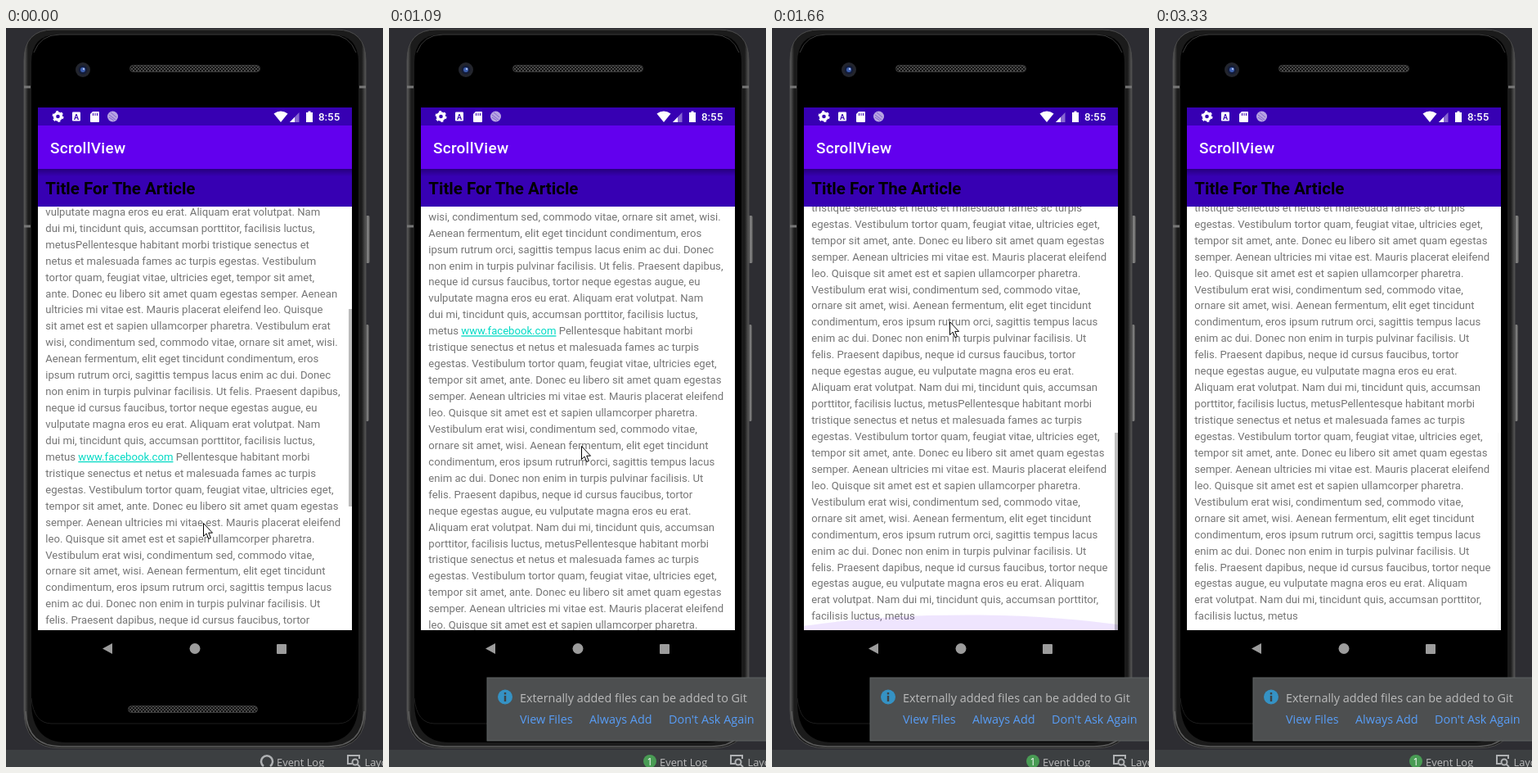
An HTML page that plays this animation: 461x902 px, repeating every 3600 ms.

```html
<!DOCTYPE html>
<html lang="en">
<head>
<meta charset="utf-8">
<title>ScrollView</title>
<style>
html, body { margin: 0; width: 100%; height: 100%; overflow: hidden; background: #2d2d32; }
svg { display: block; }
text { white-space: pre; }
.roboto { font-family: Roboto, sans-serif; }
.ide { font-family: "Open Sans", sans-serif; font-size: 14.4px; fill: #bbb; }
.link { fill: #589df6; }
</style>
</head>
<body>
<svg width="461" height="902" viewBox="0 0 461 902">
  <defs>
    <linearGradient id="rim">
      <stop offset="0" stop-color="#606060"/>
      <stop offset=".012" stop-color="#1b1b1b"/>
      <stop offset=".988" stop-color="#1b1b1b"/>
      <stop offset="1" stop-color="#5a5a5a"/>
    </linearGradient>
    <linearGradient id="key">
      <stop offset="0" stop-color="#333"/>
      <stop offset=".6" stop-color="#8a8a8a"/>
      <stop offset="1" stop-color="#444"/>
    </linearGradient>
    <linearGradient id="shade" x2="0" y2="1">
      <stop offset="0" stop-opacity=".3"/>
      <stop offset="1" stop-opacity="0"/>
    </linearGradient>
    <pattern id="mesh" width="4" height="4" patternUnits="userSpaceOnUse">
      <rect width="4" height="4" fill="#111"/>
      <path d="M0 4L4 0M0 0L4 4" stroke="#4a4a4a"/>
    </pattern>
  </defs>

  <!-- phone body -->
  <rect x="439" y="229" width="6" height="58" rx="2" fill="url(#key)"/>
  <rect x="439" y="362" width="5" height="118" rx="2" fill="url(#key)"/>
  <path d="M22 40Q22 2 58 2H404Q440 2 440 40V832Q440 879 396 879H66Q22 879 22 832Z" fill="url(#rim)" stroke="#4c4c4c"/>
  <path d="M24 834Q26 877 68 877H394Q436 877 438 834" fill="none" stroke="#5c5c5c" stroke-width="1.5"/>
  <path d="M31 42Q31 8 64 8H398Q431 8 431 42V822Q431 872 388 872H74Q31 872 31 822Z"/>
  <path d="M34 30Q42 8 66 8H396Q420 8 428 30" fill="none" stroke="#3a3a3a"/>
  <path d="M31 818Q34 849 56 849H406Q428 849 431 818" fill="none" stroke="#1d1d1d"/>
  <path d="M22 72h8M22 242h8M432 72h8" stroke="#777" stroke-width="3"/>
  <circle cx="94" cy="51" r="9" fill="#23252d"/>
  <circle cx="94" cy="51" r="5.5" fill="#141c38"/>
  <circle cx="94" cy="51" r="3" fill="#3d5fae"/>
  <circle cx="95" cy="50" r="1.2" fill="#a9bdf0"/>
  <g fill="url(#mesh)" stroke="#3a3a3a">
    <rect x="151.5" y="45.500" width="159" height="8" rx="4"/>
    <rect x="149.5" y="827.5" width="158" height="8" rx="4"/>
  </g>

  <!-- app bars -->
  <rect x="39" y="97" width="384" height="121" fill="#3700b3"/>
  <rect x="39" y="119" width="384" height="53" fill="#6200ee"/>
  <rect x="39" y="172" width="384" height="9" fill="url(#shade)"/>
  <g class="roboto">
    <text x="54" y="153" font-size="19" font-weight="500" letter-spacing=".25" fill="#fff">ScrollView</text>
    <text x="48.300" y="203" font-size="20.53" font-weight="700">Title For The Article</text>
    <text x="382" y="113" font-size="13.3" font-weight="500" fill="#fff">8:55</text>
    <g fill="#fff">
      <circle cx="63.500" cy="108" r="4" fill="none" stroke="#fff" stroke-width="3.4"/>
      <circle cx="63.500" cy="108" r="6" fill="none" stroke="#fff" stroke-width="2" stroke-dasharray="2.9 3.38"/>
      <rect x="81" y="102.500" width="10" height="11" rx="1"/>
      <path d="M106 102h7q1 0 1 1v11q0 1-1 1h-9q-1 0-1-1v-9z"/>
      <path d="M106.500 104v3M109 104v3M111.500 104v3" stroke="#3700b3"/>
      <path d="M336 115L327.500 104.500Q336 98.500 344.500 104.500Z"/>
      <path d="M347 115L358.500 103V115Z" opacity=".4"/>
      <path d="M347 115L353 108.700V115Z"/>
      <path d="M367 103h2.500v-1.500h3v1.500H375v12h-8z"/>
    </g>
    <text x="86" y="111.500" font-size="9" font-weight="700" text-anchor="middle" fill="#3700b3">A</text>
    <circle cx="130.500" cy="108" r="6.500" fill="#b7a4e2"/>
    <path d="M126 106l8 6M126 109l6 4M128 103l7 6" stroke="#8062cc"/>
  </g>

  <!-- article -->
  <svg x="39" y="218" width="384" height="517" class="roboto">
    <rect width="384" height="517" fill="#fff"/>
    <g id="article" font-size="13.14" fill="#757575"></g>
    <ellipse id="glow" cx="198" rx="461" fill="#6200ee"/>
    <rect id="bar" x="380" width="4" height="241" fill="#000"/>
  </svg>

  <g fill="#9c9c9c">
    <path d="M118 757.500L130 751V764Z"/>
    <circle cx="231" cy="757.500" r="6.500"/>
    <rect x="331" y="752" width="12" height="12" rx="1"/>
  </g>

  <!-- status strip -->
  <rect y="881" width="461" height="21" fill="#3c3f41"/>
  <g class="ide" style="font-size:12.9px">
    <text x="331" y="901">Event Log</text>
    <text x="438.500" y="901">Layout Inspector</text>
  </g>
  <g fill="none" stroke="#afb1b3" stroke-width="2">
    <path d="M432 892V888H418V898H423"/>
    <circle cx="427" cy="896" r="3.500"/>
    <path d="M429.500 898.500L433 902"/>
    <path id="idle" d="M315 901A7 7 0 1 1 323 901" stroke-width="2.500"/>
  </g>
  <g id="badge">
    <circle cx="319" cy="895" r="8" fill="#499c54"/>
    <text class="ide" x="319" y="899.500" text-anchor="middle" style="font-size:12px;fill:#fff">1</text>
  </g>

  <!-- notification -->
  <g id="popup" class="ide">
    <rect x="120" y="793" width="350" height="77" fill="#4d4f50" stroke="#5e6263"/>
    <circle cx="142" cy="816.500" r="9" fill="#3592c4"/>
    <path d="M142 811v2.500M142 815v7" stroke="#3d4346" stroke-width="2.400"/>
    <text x="160" y="823">Externally added files can be added to Git</text>
    <g class="link">
      <text x="160" y="849">View Files</text>
      <text x="245" y="849">Always Add</text>
      <text x="342" y="849">Don't Ask Again</text>
    </g>
  </g>

  <path id="cursor" d="M.5 .5V16.500L4 13L6.800 19.500L9.400 18.400L6.700 12.200H11.500Z" fill="#fff" stroke="#000"/>
</svg>
<script>
const $ = id => document.getElementById(id);
const set = (id, attrs) => { for (const k in attrs) $(id).setAttribute(k, attrs[k]); };

const opening = `vulputate magna eros eu erat. Aliquam erat volutpat. Nam
dui mi, tincidunt quis, accumsan porttitor, facilisis luctus,`;
const passage = `tristique senectus et netus et malesuada fames ac turpis
egestas. Vestibulum tortor quam, feugiat vitae, ultricies eget,
tempor sit amet, ante. Donec eu libero sit amet quam egestas
semper. Aenean ultricies mi vitae est. Mauris placerat eleifend
leo. Quisque sit amet est et sapien ullamcorper pharetra.
Vestibulum erat wisi, condimentum sed, commodo vitae,
ornare sit amet, wisi. Aenean fermentum, elit eget tincidunt
condimentum, eros ipsum rutrum orci, sagittis tempus lacus
enim ac dui. Donec non enim in turpis pulvinar facilisis. Ut`;
const article = `${opening}
metusPellentesque habitant morbi tristique senectus et
netus et malesuada fames ac turpis egestas. Vestibulum
tortor quam, feugiat vitae, ultricies eget, tempor sit amet,
ante. Donec eu libero sit amet quam egestas semper. Aenean
ultricies mi vitae est. Mauris placerat eleifend leo. Quisque
sit amet est et sapien ullamcorper pharetra. Vestibulum erat
wisi, condimentum sed, commodo vitae, ornare sit amet, wisi.
Aenean fermentum, elit eget tincidunt condimentum, eros
ipsum rutrum orci, sagittis tempus lacus enim ac dui. Donec
non enim in turpis pulvinar facilisis. Ut felis. Praesent dapibus,
neque id cursus faucibus, tortor neque egestas augue, eu
${opening}
metus <tspan fill="#03dac5" text-decoration="underline">www.facebook.com</tspan> Pellentesque habitant morbi
${passage}
felis. Praesent dapibus, neque id cursus faucibus, tortor
neque egestas augue, eu vulputate magna eros eu erat.
Aliquam erat volutpat. Nam dui mi, tincidunt quis, accumsan
porttitor, facilisis luctus, metusPellentesque habitant morbi
${passage}
felis. Praesent dapibus, neque id cursus faucibus, tortor neque
egestas augue, eu vulputate magna eros eu erat. Aliquam
erat volutpat. Nam dui mi, tincidunt quis, accumsan porttitor,
facilisis luctus, metus`;
$('article').innerHTML = article.split('\n')
  .map((line, i) => `<text x="9.3" y="${10.8 + i * 19.94}">${line}</text>`).join('');

const ticks = [0, 150, 280, 430, 550, 700, 820, 970, 1090, 1240, 1390, 1510, 1660,
  1790, 1940, 2090, 2210, 2360, 2480, 2660, 2790, 2910, 3030, 3180, 3330];

// Tracks: [time, value, ...], linear in between.
const scrollTrack = [[280, 0], [430, 72], [550, 153.6], [1090, 153.6], [1240, 165.3],
  [1390, 243], [1510, 315.5], [1660, 324]];
const cursorTrack = [[0, 241, 604], [280, 240, 590], [430, 232, 498], [550, 224, 418],
  [820, 235, 583], [970, 239, 572], [1090, 235, 510], [1240, 220, 478], [1390, 216, 403],
  [1510, 217, 363], [1790, 217, 354], [1940, 242, 530], [2090, 247, 554], [2210, 246, 543],
  [2480, 238, 434], [2660, 234, 400]];
const glowTrack = [[1510, 0, .1], [1660, .3, .1], [1940, .6, .1], [2090, .2, .05],
  [2210, 0, 0], [2480, 0, .16], [2660, .77, .16], [3180, 0, 0]];
const barTrack = [[0, 1], [280, 0], [430, 1], [820, 1], [1090, 0], [1240, 1],
  [2210, 1], [2480, 0], [2660, 1], [3030, 1], [3330, .08]];

function at(track, t) {
  const i = track.findIndex(key => key[0] > t);
  if (i === 0) return track[0].slice(1);
  if (i < 0) return track[track.length - 1].slice(1);
  const a = track[i - 1], b = track[i], p = (t - a[0]) / (b[0] - a[0]);
  return a.slice(1).map((v, k) => v + (b[k + 1] - v) * p);
}

function draw() {
  const now = performance.now() % 3600;
  const t = ticks.filter(tick => tick <= now).pop();
  const [scroll] = at(scrollTrack, t);
  const [x, y] = at(cursorTrack, t);
  const [size, alpha] = at(glowTrack, t);
  const [bar] = at(barTrack, t);

  set('article', { transform: `translate(0 ${-scroll})` });
  set('bar', { y: 125 + scroll * .466, opacity: bar * .26 });
  set('glow', { cy: 517 + 399 * size, ry: 461 * size, opacity: alpha });
  set('cursor', { transform: `translate(${x} ${y})`, opacity: t > 2660 ? 0 : 1 });
  set('popup', { opacity: t < 150 ? 0 : t < 280 ? .5 : 1 });
  set('badge', { opacity: t < 430 ? 0 : 1 });
  set('idle', { opacity: t < 430 ? 1 : 0 });
  requestAnimationFrame(draw);
}
draw();
</script>
</body>
</html>
```
